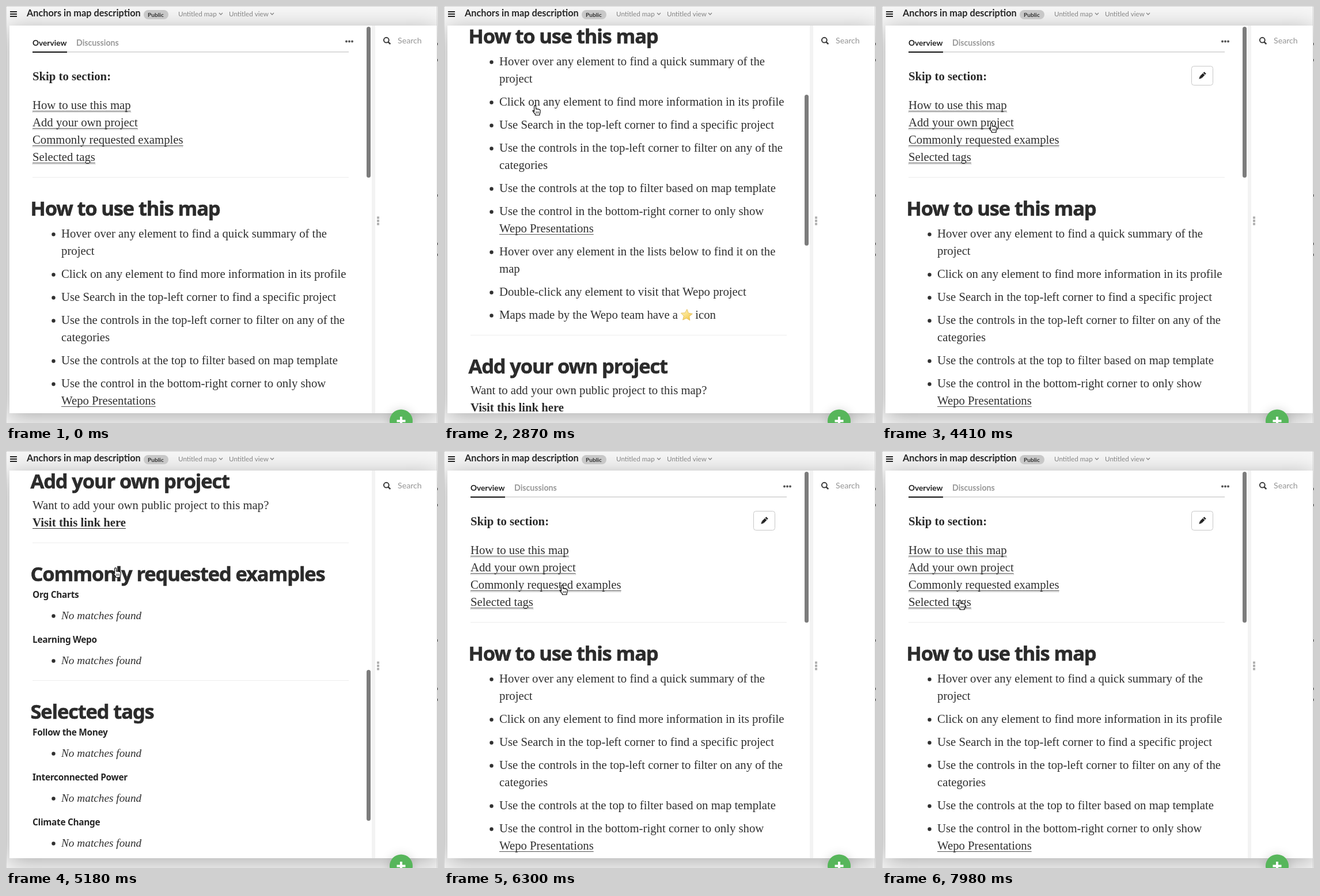
An HTML page with a canvas for the animation above (8000 ms loop, 750 by 724 pixels).

```html
<!DOCTYPE html>
<html lang="en">
<head>
<meta charset="utf-8">
<title>Anchors in map description</title>
<style>
html, body { margin: 0; width: 100%; height: 100%; overflow: hidden; background: #f3f3f3; }
canvas { display: block; width: 750px; height: 724px; }
</style>
</head>
<body>
<canvas id="stage" width="750" height="724"></canvas>
<script>
const ctx = document.getElementById('stage').getContext('2d');
const LOOP = 8000, STEP = 70;
const INK = '#303030';
const SERIF = '"Liberation Serif", serif';
const HEAD = '"Noto Sans", sans-serif';
const UI = 'Lato, sans-serif';

// kind, vertical centre of the line in the document, text
const DOC = [
  ['bold', 123, 'Skip to section:'],
  ['anchor', 173, 'How to use this map'],
  ['anchor', 203, 'Add your own project'],
  ['anchor', 233, 'Commonly requested examples'],
  ['anchor', 263, 'Selected tags'],
  ['rule', 297],
  ['title', 351, 'How to use this map'],
  ['item', 396, 'Hover over any element to find a quick summary of the'],
  ['more', 426, 'project'],
  ['item', 466, 'Click on any element to find more information in its profile'],
  ['item', 506, 'Use Search in the top-left corner to find a specific project'],
  ['item', 546, 'Use the controls in the top-left corner to filter on any of the'],
  ['more', 576, 'categories'],
  ['item', 616, 'Use the controls at the top to filter based on map template'],
  ['item', 656, 'Use the control in the bottom-right corner to only show'],
  ['link', 686, 'Wepo Presentations'],
  ['item', 726, 'Hover over any element in the lists below to find it on the'],
  ['more', 756, 'map'],
  ['item', 796, 'Double-click any element to visit that Wepo project'],
  ['starred', 836, 'Maps made by the Wepo team have a ', 'icon'],
  ['rule', 870],
  ['title', 924, 'Add your own project'],
  ['plain', 967, 'Want to add your own public project to this map?'],
  ['boldLink', 997, 'Visit this link here'],
  ['rule', 1031],
  ['title', 1085, 'Commonly requested examples'],
  ['group', 1121, 'Org Charts'],
  ['group', 1199, 'Learning Wepo'],
  ['rule', 1270],
  ['title', 1324, 'Selected tags'],
  ['group', 1360, 'Follow the Money'],
  ['group', 1438, 'Interconnected Power'],
  ['group', 1516, 'Climate Change'],
  ['group', 1594, 'Public Health'],
  ['group', 1672, 'Food Systems']
];

// time, scroll offset (held until the next entry)
const SCROLL = [
  [0, 0], [2870, 299], [3500, 95], [3570, 0],
  [4620, 872], [5250, 260], [5320, 0],
  [6580, 1033], [7000, 960], [7070, 600], [7140, 270], [7210, 70], [7280, 0]
];

const linear = p => p;
const easeOut = p => 1 - (1 - p) * (1 - p);
const easeInOut = p => p * p * (3 - 2 * p);

// start, end, from, to, easing
const MOVES = [
  [1540, 1890, [632, 216], [348, 202], linear],
  [1890, 2310, [348, 202], [161, 181], easeOut],
  [2870, 3430, [161, 181], [232, 220], easeInOut],
  [3710, 4060, [232, 220], [194, 203], easeInOut],
  [4200, 4410, [194, 203], [193, 211], easeInOut],
  [5670, 6300, [193, 211], [208, 241], easeInOut],
  [7490, 7980, [208, 241], [138, 267], easeInOut]
];

const scrollAt = t => SCROLL.filter(k => k[0] <= t).pop()[1];

function pointerAt(t) {
  const move = MOVES.filter(m => m[0] <= t).pop();
  if (!move) return null;
  const [start, end, from, to, ease] = move;
  const p = ease(Math.min(1, (t - start) / (end - start)));
  return from.map((v, i) => v + (to[i] - v) * p);
}

function text(str, x, y, font, color = INK, spacing = 0) {
  ctx.font = font;
  ctx.fillStyle = color;
  ctx.letterSpacing = spacing + 'px';
  ctx.fillText(str, x, y);
  return ctx.measureText(str).width;
}

function box(x, y, w, h, color) {
  ctx.fillStyle = color;
  ctx.fillRect(x, y, w, h);
}

function pill(x, y, w, h, r, color) {
  ctx.beginPath();
  ctx.roundRect(x, y, w, h, r);
  ctx.fillStyle = color;
  ctx.fill();
}

function dot(x, y, r, color) {
  ctx.beginPath();
  ctx.arc(x, y, r, 0, Math.PI * 2);
  ctx.fillStyle = color;
  ctx.fill();
}

function outline(color, width) {
  ctx.strokeStyle = color;
  ctx.lineWidth = width;
  ctx.stroke();
}

function line(points, color, width) {
  ctx.beginPath();
  points.forEach(([x, y]) => ctx.lineTo(x, y));
  outline(color, width);
}

function shadow(color, blur, y = 0) {
  ctx.shadowColor = color;
  ctx.shadowBlur = blur;
  ctx.shadowOffsetY = y;
}

const noShadow = () => shadow('transparent', 0);

function star(cx, cy) {
  ctx.beginPath();
  for (let i = 0; i < 10; i++) {
    const a = -Math.PI / 2 + i * Math.PI / 5 + 0.06;
    const r = i % 2 ? 5 : 10.4;
    ctx.lineTo(cx + Math.cos(a) * r, cy + Math.sin(a) * r);
  }
  ctx.closePath();
  const glow = ctx.createLinearGradient(cx - 6, cy - 8, cx + 6, cy + 8);
  glow.addColorStop(0, '#fff3b4');
  glow.addColorStop(1, '#f3c648');
  ctx.fillStyle = glow;
  ctx.fill();
  outline('#e3bb55', 0.9);
}

const serif = (style = '', size = 20.75) => `${style} ${size}px ${SERIF}`;
const bullet = y => dot(82.5, y + 0.5, 3.2, INK);

const draw = {
  plain: (y, s) => text(s, 46, y + 6, serif()),
  bold: (y, s) => text(s, 46, y + 6, serif('bold'), '#2b2b2b'),
  more: (y, s) => text(s, 96, y + 6, serif()),
  item(y, s) {
    bullet(y);
    return draw.more(y, s);
  },
  link(y, s) {
    box(96, y + 9, draw.more(y, s), 1, '#555');
  },
  boldLink(y, s) {
    box(46, y + 9, draw.bold(y, s), 1, '#333');
  },
  anchor(y, s) {
    const w = draw.plain(y, s);
    box(46, y + 9, w, 1, '#555');
    for (let x = 46; x < 46 + w; x += 2) box(x, y + 11, 1, 1, '#888');
  },
  starred(y, s, tail) {
    const x = 96 + draw.item(y, s);
    star(x + 10, y);
    text(tail, x + 25, y + 6, serif());
  },
  rule: y => box(46, y, 549, 1, '#ededed'),
  title(y, s) {
    text(s, 42.5, y + 13, `bold 34.5px ${HEAD}`, '#2b2b2b', -1.15);
    ctx.strokeStyle = '#2b2b2b';
    ctx.lineWidth = 0.6;
    ctx.strokeText(s, 42.5, y + 13);
  },
  group(y, s) {
    text(s, 46, y + 5.5, `bold 15.4px ${HEAD}`, '#262626', -0.3);
    bullet(y + 37);
    text('No matches found', 96, y + 43, serif('italic', 19.3));
  }
};

function pencilButton() {
  ctx.beginPath();
  ctx.roundRect(537.5, 104.5, 37, 33, 4);
  outline('#c8c8c8', 1);
  ctx.save();
  ctx.translate(556, 121);
  ctx.rotate(Math.PI / 4);
  box(-2.3, -7.2, 4.6, 2.6, '#222');
  box(-2.3, -3.8, 4.6, 7.4, '#222');
  ctx.beginPath();
  ctx.moveTo(-2.3, 3.6);
  ctx.lineTo(2.3, 3.6);
  ctx.lineTo(0, 8);
  ctx.fill();
  ctx.restore();
}

function tabs() {
  text('Overview', 46, 68.5, `bold 13.7px ${UI}`, '#222');
  text('Discussions', 122, 68.5, `bold 14.2px ${UI}`, '#999');
  box(46, 79, 549, 1.5, '#cfcfcf');
  box(46, 79, 60, 2, '#111');
  [591, 596, 601].forEach(x => dot(x, 61.5, 2, '#555'));
}

function frame() {
  box(0, 0, 750, 724, '#f6f6f6');
  shadow('rgba(0,0,0,.3)', 36, 6);
  box(6, 34, 742, 673, '#fff');
  noShadow();
  box(0, 0, 750, 1, '#d6d6d6');
  box(0, 0, 1, 724, 'rgba(0,0,0,.1)');
  box(748, 0, 1, 724, '#c9c9c9');
  [64, 92, 327, 411, 430].forEach(y => box(749, y, 1, 4, '#444'));
}

function header() {
  [9, 13, 17].forEach(y => box(7, y, 12, 2, '#222'));
  text('Anchors in map description', 36, 18, `bold 16.3px ${UI}`, '#262626');
  pill(239, 7, 43, 16, 8, '#c8c8c8');
  text('Public', 246, 18.5, `bold 10.2px ${UI}`, '#333');
  text('Untitled map', 299, 18, `11.7px ${UI}`, '#858585');
  text('Untitled view', 387, 18, `11.7px ${UI}`, '#858585');
  [373, 462].forEach(x => line([[x - 3, 12], [x, 15], [x + 3, 12]], '#858585', 1.3));
}

function sidePanel() {
  box(635, 34, 6, 673, '#f3f3f3');
  [365.5, 371, 376.5].forEach(y => box(644, y, 4, 4, '#b0b0b0'));
  ctx.beginPath();
  ctx.arc(660.3, 59.2, 4.4, 0, Math.PI * 2);
  outline('#3a3a3a', 2);
  line([[663.5, 62.4], [667.3, 66.2]], '#3a3a3a', 2.5);
  text('Search', 680, 65, `14.2px ${UI}`, '#959595');
}

function addButton() {
  shadow('rgba(0,0,0,.18)', 18, 1);
  dot(686, 720.5, 20, '#57b65b');
  noShadow();
  box(684, 713, 4, 15, '#fff');
  box(678.5, 718.5, 15, 4, '#fff');
}

const HAND = new Path2D('M-4.4 2.5V-6.6a1.5 1.5 0 0 1 3 0V-2q1.4-.9 2.6.2 1.4-.7 2.5.5 2-.4 2.4 1.4V3.3q0 2-1.1 3.2V8.5H-2.6V6.8Q-6 3.5-7 1q.2-1.9 2.6.8z');

function pointer([x, y]) {
  ctx.save();
  ctx.translate(Math.round(x), Math.round(y));
  ctx.fillStyle = '#fff';
  ctx.fill(HAND);
  ctx.strokeStyle = '#111';
  ctx.lineWidth = 1.2;
  ctx.lineJoin = 'round';
  ctx.stroke(HAND);
  [-1, 1.2, 3.4].forEach(x => line([[x, 2], [x, 5.8]], '#222', 0.9));
  ctx.restore();
}

function description(scroll, hovered) {
  ctx.save();
  ctx.beginPath();
  ctx.rect(6, 34, 629, 673);
  ctx.clip();
  ctx.translate(0, -scroll);
  tabs();
  if (hovered) pencilButton();
  for (const [kind, y, ...strings] of DOC) {
    if (y > scroll - 30 && y < scroll + 740) draw[kind](y, ...strings);
  }
  ctx.restore();
  pill(626, 36 + scroll * 0.3945, 7, 262, 3.5, '#7c7c7c');
}

function render(now) {
  const t = Math.floor((now % LOOP) / STEP + 1e-6) * STEP;
  const hand = pointerAt(t);
  frame();
  header();
  sidePanel();
  description(scrollAt(t), hand);
  addButton();
  if (hand) pointer(hand);
}

const begin = performance.now();
function tick() {
  render(performance.now() - begin);
  requestAnimationFrame(tick);
}
tick();
</script>
</body>
</html>
```
